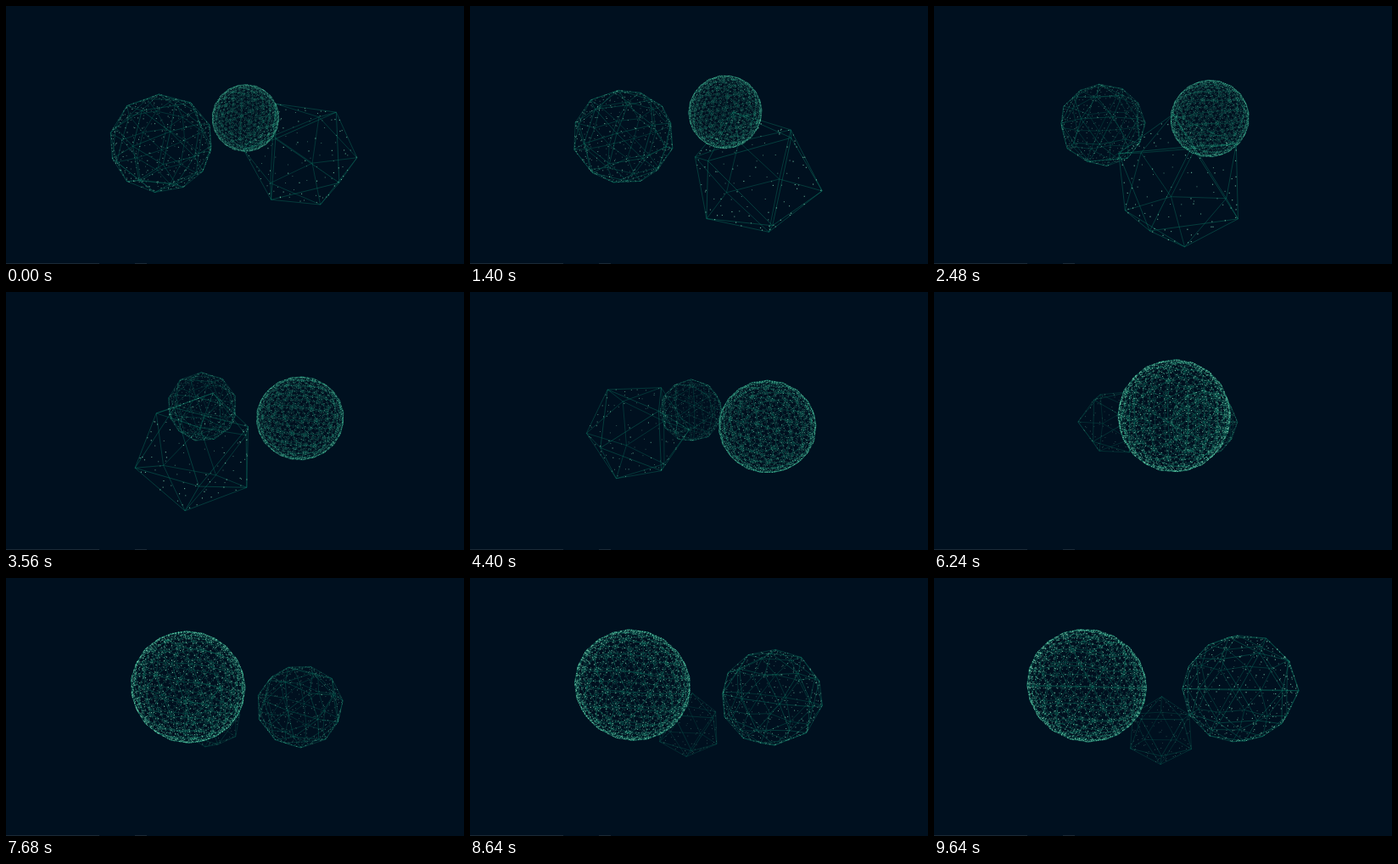
An HTML page with a canvas that plays this animation: 540 px wide and 304 px high, repeating every 9.68 s.

```html
<!DOCTYPE html>
<html>
<head>
<meta charset="utf-8">
<style>
html, body { margin: 0; width: 100%; height: 100%; overflow: hidden; background: #00101f; }
canvas { display: block; }
</style>
</head>
<body>
<canvas id="stage" width="540" height="304"></canvas>
<script>
const ctx = document.getElementById('stage').getContext('2d');
const LOOP = 9680, FOCAL = 235, ORBIT = 1.54, RAD = Math.PI / 180;

let seed = 7;
const random = () => (seed = seed * 16807 % 2147483647) / 2147483647;

const normalize = p => p.map(v => v / Math.hypot(...p));
const middle = (p, q) => p.map((v, i) => (v + q[i]) / 2);
const distance = (p, q) => Math.hypot(...p.map((v, i) => v - q[i]));

function icosahedronFaces() {
  const g = (1 + Math.sqrt(5)) / 2, points = [], faces = [];
  for (const a of [-1, 1]) for (const b of [-g, g])
    points.push([0, b, a], [b, a, 0], [a, 0, b]);
  const near = (i, j) => distance(points[i], points[j]) < 2.1;
  for (let i = 0; i < 12; i++) for (let j = 0; j < i; j++) for (let k = 0; k < j; k++)
    if (near(i, j) && near(j, k) && near(i, k))
      faces.push([i, j, k].map(n => normalize(points[n])));
  return faces;
}

function subdivide(faces) {
  return faces.flatMap(([a, b, c]) => {
    const ab = normalize(middle(a, b)), bc = normalize(middle(b, c)), ca = normalize(middle(c, a));
    return [[a, ab, ca], [b, bc, ab], [c, ca, bc], [ab, bc, ca]];
  });
}

// Six evenly spread dots per face, each nudged by the given jitter.
function makeBody(faces, angle, jitter) {
  const center = [ORBIT * Math.sin(angle * RAD), 0, ORBIT * Math.cos(angle * RAD)];
  const place = p => p.map((v, i) => v + center[i]);
  const nudge = () => (random() - 0.5) * jitter;
  const edges = new Map(), dots = [];
  for (const [a, b, c] of faces) {
    for (const [p, q, r] of [[a, b, c], [b, c, a], [c, a, b]]) {
      edges.set(middle(p, q).map(v => Math.round(v * 1000)).join(), [place(p), place(q)]);
      for (const share of [0.1, 0.445]) {
        const u = share + nudge(), v = share + nudge();
        dots.push(place(p.map((x, i) => x + u * (q[i] - x) + v * (r[i] - x))));
      }
    }
  }
  return { edges: [...edges.values()], dots };
}

const coarse = icosahedronFaces(), medium = subdivide(coarse), fine = subdivide(medium);
const bodies = [makeBody(coarse, 0, 0.2), makeBody(medium, 120, 0.15), makeBody(fine, 240, 0.05)];

// The camera sways around the scene while the three bodies turn together.
function makeProjector(time) {
  const sway = (time - 1700) / 17200 * 360, lift = (time - 1800) / 16200 * 360;
  const yaw = (-144.5 + 0.45 * sway + 69 * Math.sin((sway - 65) * RAD)) * RAD;
  const side = 3.5 * Math.sin(sway * RAD), height = 2 * Math.cos(lift * RAD);
  const dist = Math.hypot(side, height, 3.85), tilt = Math.asin(height / dist);
  const cy = Math.cos(yaw), sy = Math.sin(yaw), ct = Math.cos(tilt), st = Math.sin(tilt);
  return ([x, y, z]) => {
    const depth = z * cy - x * sy;
    const far = dist + depth * ct - y * st, scale = FOCAL / far;
    return [270 + (x * cy + z * sy) * scale, 152 - (y * ct + depth * st) * scale, far];
  };
}

const fade = far => Math.max(0.4, Math.min(1, 1.35 - far * 0.13));

function draw(now) {
  const project = makeProjector(now % LOOP);
  ctx.globalAlpha = 1;
  ctx.fillStyle = '#00101f';
  ctx.fillRect(0, 0, 540, 304);
  ctx.fillStyle = '#1b2a36';
  ctx.fillRect(0, 303, 110, 1);
  ctx.fillRect(152, 303, 14, 1);

  ctx.strokeStyle = '#0f8a70';
  ctx.lineWidth = 0.7;
  for (const { edges } of bodies) for (const [a, b] of edges) {
    const p = project(a), q = project(b);
    ctx.globalAlpha = 0.55 * fade((p[2] + q[2]) / 2);
    ctx.beginPath();
    ctx.moveTo(p[0], p[1]);
    ctx.lineTo(q[0], q[1]);
    ctx.stroke();
  }

  ctx.fillStyle = '#84e6c0';
  for (const { dots } of bodies) for (const dot of dots) {
    const [x, y, far] = project(dot), size = Math.max(0.75, Math.min(1.15, 3.4 / far));
    ctx.globalAlpha = 0.75 * fade(far);
    ctx.fillRect(x - size / 2, y - size / 2, size, size);
  }
  requestAnimationFrame(draw);
}
requestAnimationFrame(draw);
</script>
</body>
</html>
```
